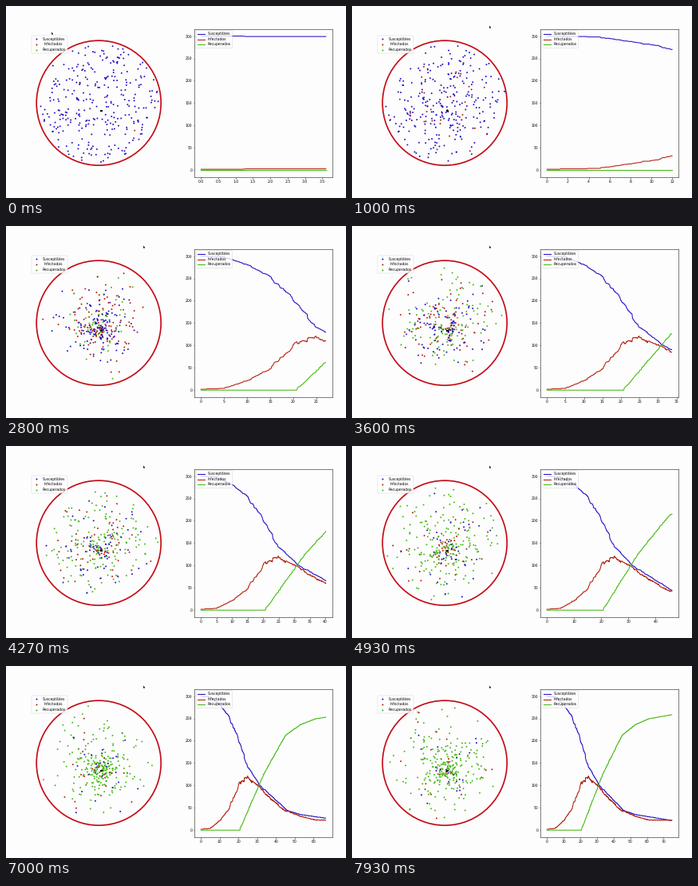
Recreate the animation shown at these times as a matplotlib script. Size 426x240 px, loop 8 s.

```python
import numpy as np
import matplotlib.pyplot as plt
from matplotlib.animation import FuncAnimation
from matplotlib.patches import Circle, FancyBboxPatch, Polygon, Rectangle

W, H = 426, 240
FRAMES, LOOP = 120, 8000
N = 302
PT = 0.72  # points per pixel at 100 dpi
BACK, FRAME = "#fdfdfd", "#4a4a44"
NAMES = ["Susceptibles", "Infectados", "Recuperados"]
COLORS = ["#2410c4", "#b4200e", "#48b816"]
RGB = np.array([[int(c[k:k + 2], 16) / 255 for k in (1, 3, 5)] for c in COLORS])
MID, RADIUS = np.array([116.2, 121.2]), 78
HUB = np.array([119.7, 131.0])

plt.rcParams.update({
    "font.family": "DejaVu Sans",
    "font.size": 4.5 * PT,
    "text.hinting": "none",
    "axes.linewidth": 0.7 * PT,
    "axes.edgecolor": FRAME,
})

rng = np.random.default_rng(11)
days = np.arange(0, 76, 0.1)


def count(times, values, jitter):
    """Whole people along a few key points, changing at uneven moments."""
    uneven = np.sort(days + rng.normal(0, jitter, len(days)))
    return np.round(np.interp(uneven, times, values))


sus = count([0, 5, 10, 15, 20.5, 24, 31, 46, 53, 76],
            [300, 298, 281, 254, 198, 150, 102, 44, 35, 21], 0.5)
rec = count([20.5, 33.7, 45, 53, 61, 76], [0, 127, 212, 236, 249, 259], 0.15)
series = [sus, N - sus - rec, rec]


def day_at(ms):
    s = ms / 1000
    return 3.6 + 8.37 * s + 1.28 * max(0, s - 3.6)


def in_disc(r):
    a = rng.uniform(0, 2 * np.pi, N)
    d = r * np.sqrt(rng.uniform(0, 1, N))
    return MID + np.column_stack([d * np.cos(a), d * np.sin(a)])


def near_hub():
    return HUB + rng.normal(0, 6, (N, 2))


def walk(speed=2.2):
    """People travel between random places and the hub."""
    pos = in_disc(75)
    inward = rng.uniform(size=N) < 0.6
    goal = np.where(inward[:, None], near_hub(), in_disc(74))
    wait = rng.integers(0, 30, N)
    path = []
    for _ in range(FRAMES):
        path.append(pos)
        gap = goal - pos
        dist = np.hypot(*gap.T) + 1e-9
        go = wait <= 0
        step = np.minimum(speed, dist) / dist * go
        pos = pos + gap * step[:, None] + rng.normal(0, 0.2, (N, 2))
        done = go & (dist < speed)
        inward = inward ^ done
        fresh = np.where(inward[:, None], near_hub(), in_disc(74))
        goal = np.where(done[:, None], fresh, goal)
        wait = np.where(done, rng.integers(0, 6, N), wait - 1)
    return path


path = walk()
fig = plt.figure(figsize=(W / 100, H / 100), dpi=100, facecolor=BACK)


def pixel_axes(z):
    ax = fig.add_axes([0, 0, 1, 1], zorder=z)
    ax.set(xlim=(0, W), ylim=(H, 0))
    ax.axis("off")
    return ax


def legend_box(ax, x, y, w=45, h=22):
    ax.add_patch(FancyBboxPatch(
        (x + 1, y + 1), w - 2, h - 2, boxstyle="round,pad=1,rounding_size=1",
        fc=(1, 1, 1, 0.8), ec=(0.8, 0.8, 0.8, 0.8), lw=0.5 * PT))


# Population
room = pixel_axes(1)
dots = room.scatter(*path[0].T, s=(1.95 * PT) ** 2, lw=0, zorder=2)
room.add_patch(Circle(MID, RADIUS, fill=False, ec="#c40c16", lw=1.7 * PT, zorder=3))
room.add_patch(Rectangle(HUB - 1.3, 2.6, 2.6, fc="#0c0c0c", lw=0, zorder=4))

# Chart
chart = fig.add_axes([236.5 / W, 1 - 213.6 / H, 172 / W, 184.4 / H], zorder=2)
chart.set_facecolor(BACK)
chart.set_ylim(-15, 315)
chart.tick_params(length=1.5 * PT, width=0.7 * PT, pad=1.6 * PT, color=FRAME)
chart.tick_params(axis="x", pad=2.2 * PT)
lines = [chart.plot([], [], color=c, lw=1.05 * PT)[0] for c in COLORS]

# Legends and pointer
top = pixel_axes(3)
legend_box(top, 32, 37)
legend_box(top, 238.4, 30.6)
for k, (name, color) in enumerate(zip(NAMES, COLORS)):
    y = 41.4 + 6.6 * k
    top.scatter([38.2], [y], s=(2 * PT) ** 2, color=color, lw=0)
    top.text(47.6 if k == 1 else 46, y + 1.2, name)
    y = 35 + 6.6 * k
    top.plot([240.2, 249.2], [y, y], color=color, lw=1.05 * PT)
    top.text(252.8, y + 1.2, name)
arrow = np.array([(0, 0), (2, 2.1), (1.6, 3.4), (0.9, 3.4), (0, 2.8)])
pointer = top.add_patch(Polygon(arrow, fc="#202020", lw=0))


def draw(i):
    ms = i * LOOP / FRAMES
    day = day_at(ms)
    now = min(int(round(day * 10)), len(days) - 1)
    for line, values in zip(lines, series):
        line.set_data(days[:now + 1], values[:now + 1])
    chart.set_xlim(-0.05 * day, 1.05 * day)

    who = np.arange(N)
    state = np.where(who < rec[now], 2, np.where(who < N - sus[now], 1, 0))
    dots.set_offsets(path[i])
    dots.set_facecolor(RGB[state])

    u = np.clip((ms - 100) / 800, 0, 1)
    u = u * u * (3 - 2 * u)
    pointer.set_xy(arrow + [57 + 115 * u, 32.5 - 8 * u])
    return [*lines, dots, pointer]


anim = FuncAnimation(fig, draw, frames=FRAMES, interval=LOOP / FRAMES,
                     init_func=lambda: draw(0), repeat=True, repeat_delay=0)
plt.show()
```
